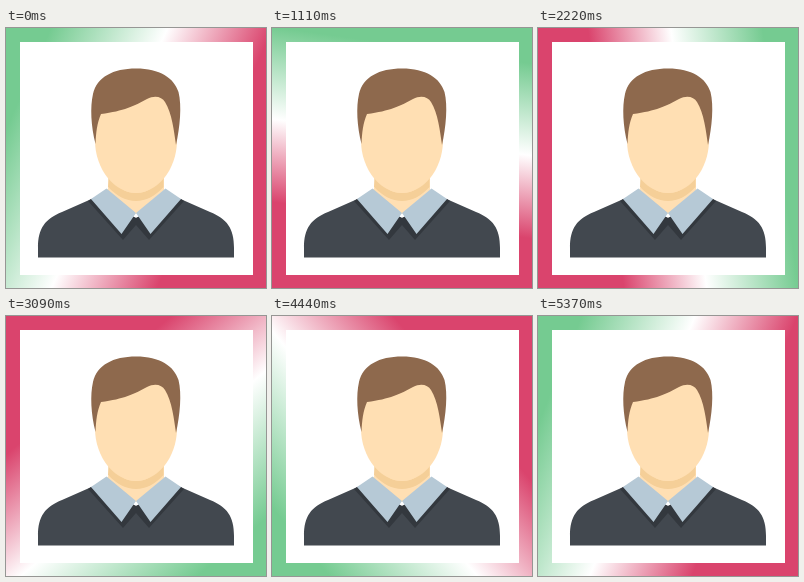
An HTML page that plays this animation: 260x260 px, repeating every 5400 ms.

```html
<!DOCTYPE html>
<html lang="en">
<head>
<meta charset="utf-8">
<title>Avatar with turning border</title>
<style>
  html, body { margin: 0; width: 100%; height: 100%; overflow: hidden; }
  #frame { position: relative; width: 260px; height: 260px; }
  svg { position: absolute; inset: 0; }
</style>
</head>
<body>
<div id="frame">
  <svg width="260" height="260" viewBox="0 0 260 260">
    <path fill="#fff" d="M14 14H247V247H14Z"/>
    <!-- neck and its shadow -->
    <path fill="#ffdfb3" d="M103 138H158V162L130 186L101 162Q103 160 103 155Z"/>
    <path fill="#f5cf98" d="M102.500 147C110 159 119 165 130 165S150 159 157.500 147V159C149 168 140 173 130 173S111 168 102 159Z"/>
    <!-- sweater -->
    <path fill="#42484f" d="M32 229.500V220C32 200 39 191 56 184L90 169L130 190L170 169L204 184C221 191 228 200 228 220V229.500Z"/>
    <path fill="#33383e" d="M85 171L82 173L117 212L130 197L143 212L178 173L175 171L130 190Z"/>
    <!-- collar -->
    <path fill="#b6c9d6" d="M100.500 160.500L85 171L115.500 206L130 185L144.500 206L175 171L159.500 160.500L130 185Z"/>
    <!-- head -->
    <path fill="#ffdfb3" d="M89 112C89 75 104 62 130 62S171 75 171 112C171 143 150 165 130 165S89 143 89 112Z"/>
    <path fill="#8e694d" d="M89.500 116C85 98 84 79 87 66C91 49 107 40.500 130 40.500C154 40.500 168 50 172.500 64C176 78 174 99 170 117C168 103 166 85 159 74C156 69 149 67 141 71C128 78 118 83 95 86C91 95 90 105 89.500 116Z"/>
  </svg>
</div>
<script>
  const LOOP = 5400, START = 114;
  const frame = document.getElementById('frame');

  function draw(now) {
    const angle = START + 360 * (now % LOOP) / LOOP;
    frame.style.background =
      `linear-gradient(${angle}deg, #75cb91 12%, #fff 43%, #da446d 71%)`;
    requestAnimationFrame(draw);
  }
  draw(0);
</script>
</body>
</html>
```
